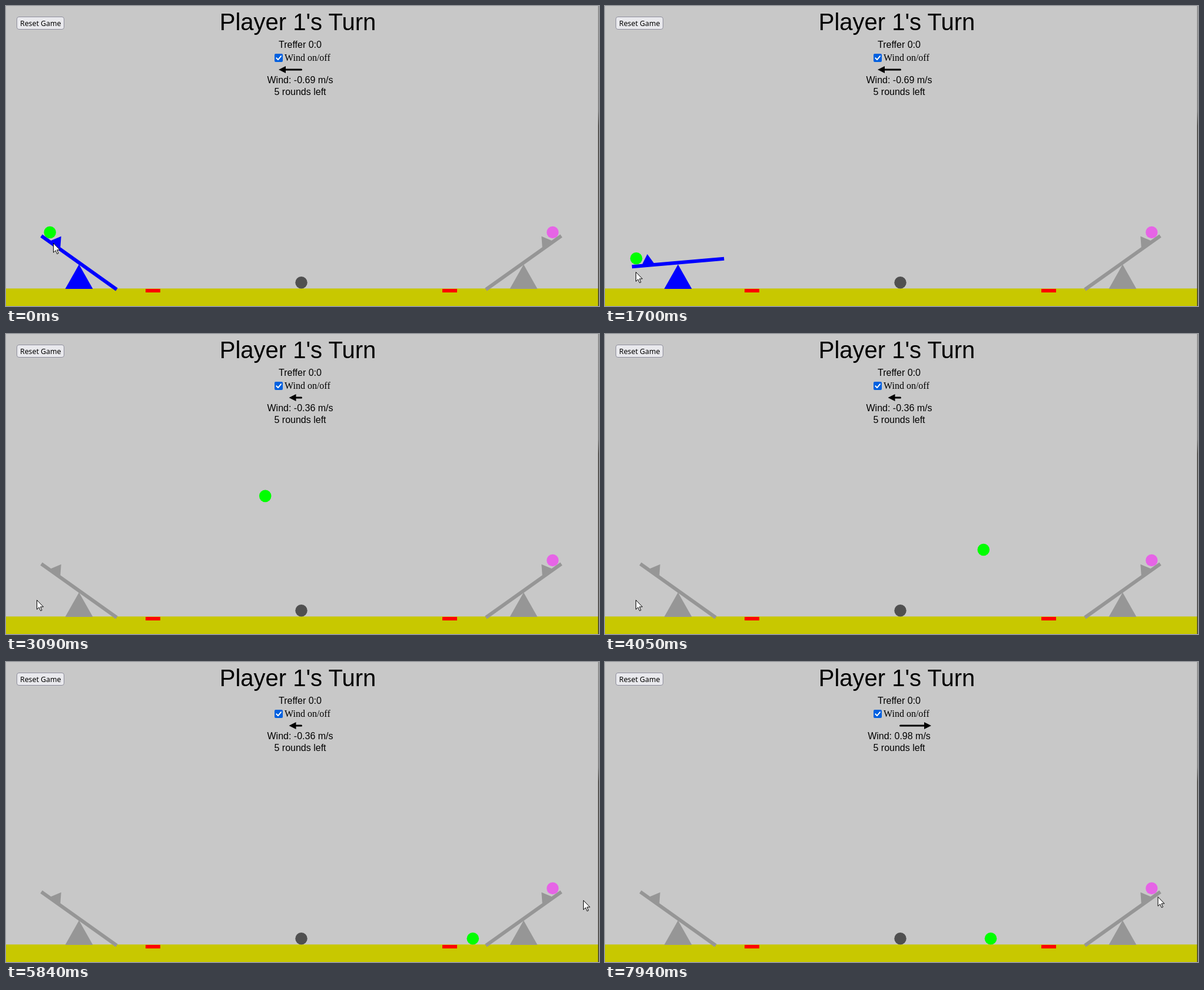
An HTML page that plays this animation: 1007x509 px, repeating every 8000 ms.

```html
<!DOCTYPE html>
<html lang="en">
<head>
<meta charset="utf-8">
<title>Seesaw game</title>
<style>
  html, body { margin: 0; width: 100%; height: 100%; overflow: hidden; background: #c8c8c8; }
  svg { display: block; width: 1007px; height: 509px; }
  .label { font: 16px "Liberation Sans", Arial, sans-serif; text-anchor: middle; }
  .title { font-size: 40px; }
  .serif { font: 16px "Liberation Serif", "Times New Roman", serif; }
  .button { font: 12.3px "Noto Sans", sans-serif; }
</style>
</head>
<body>
<svg viewBox="0 0 1007 509">
  <defs>
    <path id="foot" d="M0 3L23.5 44.5H-23.5Z"/>
    <path id="plank" d="M-78.5 -3H78.5V3H-78.5ZM-60.5 -3L-50.7 -19L-41 -3Z"/>
    <linearGradient id="edge" x2="0" y2="1">
      <stop offset="0" stop-color="#858585"/>
      <stop offset=".35" stop-color="#777"/>
      <stop offset=".4" stop-color="#3c3a36"/>
      <stop offset="1" stop-color="#3c3a36"/>
    </linearGradient>
  </defs>

  <rect width="1007" height="509" fill="#c8c8c8"/>
  <rect y="479.3" width="1007" height="30" fill="#c8c800"/>
  <path d="M237 480h25v6h-25zM741 480h25v6h-25z" fill="#f00"/>

  <rect x="18.5" y="18.5" width="80" height="21" rx="3.5" fill="#e9e9ed" stroke="#8f8f9d"/>
  <text class="button" x="24" y="34">Reset Game</text>

  <text class="label title" x="495.5" y="41">Player 1's Turn</text>
  <text class="label" x="499.5" y="71">Treffer 0:0</text>
  <rect x="456" y="81" width="14" height="14" rx="2" fill="#0060df"/>
  <path d="M459.3 88.3l2.7 2.8l5 -6" fill="none" stroke="#fff" stroke-width="2" stroke-linecap="round" stroke-linejoin="round"/>
  <text class="serif" x="473" y="93">Wind on/off</text>
  <path id="shaft" stroke="#000" stroke-width="3" stroke-linecap="round"/>
  <path id="head"/>
  <text class="label" id="wind" x="499.5" y="131"></text>
  <text class="label" x="499.5" y="151">5 rounds left</text>

  <circle cx="501.5" cy="469.3" r="10.2" fill="#505050"/>
  <g fill="#969696" transform="translate(879 435.5) scale(-1 1)">
    <use href="#foot"/>
    <use href="#plank" transform="rotate(35.4)"/>
  </g>
  <circle cx="928.3" cy="384" r="10.2" fill="#e664e6"/>
  <g id="seesaw" transform="translate(124 435.5)">
    <use href="#foot"/>
    <use id="beam" href="#plank"/>
  </g>
  <circle id="ball" r="10.3" fill="#0f0"/>

  <rect x="1005.5" width="1.5" height="509" fill="url(#edge)"/>
  <g id="cursor">
    <circle id="halo" r="15" fill="#ff0" opacity=".5"/>
    <path d="M.5 .5V16.2L4.1 12.8L6.7 18.6L9 17.6L6.5 11.9H11.5Z" fill="#fff" stroke="#000"/>
  </g>
</svg>
<script>
const $ = id => document.getElementById(id);
const LOOP = 8, GRAVITY = 648, FLOOR = 469.3, REST = 35.4;
const PRESS = 0.2, RELEASE = 1.56, LAUNCH = 1.862, ROLL = 6.46, STOP = 7.96;

// Rows of [time, ...values], linear in between
const beamKeys = [[0.07, REST], [0.81, 12.5], [1.09, -1.8], [1.23, -9.5]];
const cursorKeys = [
  [0.07, 80, 402], [0.81, 61, 425], [1.09, 55.5, 441], [1.23, 52, 451],
  [4.86, 52, 451], [4.861, 1002, 391], [5.02, 1001.5, 391], [5.64, 997, 404],
  [6.46, 928, 404], [6.67, 917, 400], [7.3, 920, 401], [7.94, 938.5, 398]
];
// Free flight after each impact
const hops = [
  { t: LAUNCH, x: 75, y: 384, vx: 318.5, vy: -487, ax: -34.7 },
  { t: 3.522, x: 556, y: 469, vx: 164, vy: -366, ax: 0 },
  { t: 4.652, x: 741.3, y: 469, vx: 155, vy: -206, ax: 0 },
  { t: 5.21, x: 827.8, y: 455, vx: -38, vy: -125, ax: 0 },
  { t: 5.66, x: 810.7, y: 464.4, vx: -99, vy: -20, ax: 0 }
];
const winds = [
  { t: 0, speed: "-0.69", tip: 463 },
  { t: 1.95, speed: "-0.36", tip: 480.5 },
  { t: 6.95, speed: "0.98", tip: 554 }
];

const latest = (list, t) => list.filter(item => item.t <= t).pop();

function sample(keys, t) {
  const i = keys.findIndex(key => key[0] > t);
  if (i === 0) return keys[0].slice(1);
  if (i < 0) return keys[keys.length - 1].slice(1);
  const [a, b] = [keys[i - 1], keys[i]];
  const s = (t - a[0]) / (b[0] - a[0]);
  return a.slice(1).map((v, k) => v + (b[k + 1] - v) * s);
}

function beamAngle(t) {
  if (t >= LAUNCH) return REST;
  const low = sample(beamKeys, t)[0];
  const s = Math.max(0, (t - RELEASE) / (LAUNCH - RELEASE));
  return low + (REST - low) * s ** 3;
}

function ballPosition(t, angle) {
  if (t < LAUNCH) {
    const a = (angle + 10.8) * Math.PI / 180;
    return [124 - 71.3 * Math.cos(a), 435.5 - 71.3 * Math.sin(a)];
  }
  if (t >= ROLL) {
    const left = Math.max(0, (STOP - t) / (STOP - ROLL));
    return [655 + 76.5 * left ** 2, FLOOR];
  }
  const hop = latest(hops, t), d = t - hop.t;
  return [
    hop.x + hop.vx * d + hop.ax * d * d / 2,
    Math.min(FLOOR, hop.y + hop.vy * d + GRAVITY * d * d / 2)
  ];
}

function drawWind({ speed, tip }) {
  const base = tip + (tip < 501.5 ? 12 : -12);
  $("shaft").setAttribute("d", `M501.5 108H${base}`);
  $("head").setAttribute("d", `M${tip} 108L${base} 102V114Z`);
  $("wind").textContent = `Wind: ${speed} m/s`;
}

function draw(t) {
  const angle = beamAngle(t);
  const [x, y] = ballPosition(t, angle);
  $("beam").setAttribute("transform", `rotate(${angle})`);
  $("seesaw").setAttribute("fill", t < LAUNCH ? "#00f" : "#969696");
  $("ball").setAttribute("cx", x);
  $("ball").setAttribute("cy", y);
  $("cursor").setAttribute("transform", `translate(${sample(cursorKeys, t).join(" ")})`);
  $("halo").setAttribute("visibility", t >= PRESS && t < RELEASE ? "visible" : "hidden");
  drawWind(latest(winds, t));
}

const start = performance.now();
function tick() {
  draw((performance.now() - start) / 1000 % LOOP);
  requestAnimationFrame(tick);
}
tick();
</script>
</body>
</html>
```
